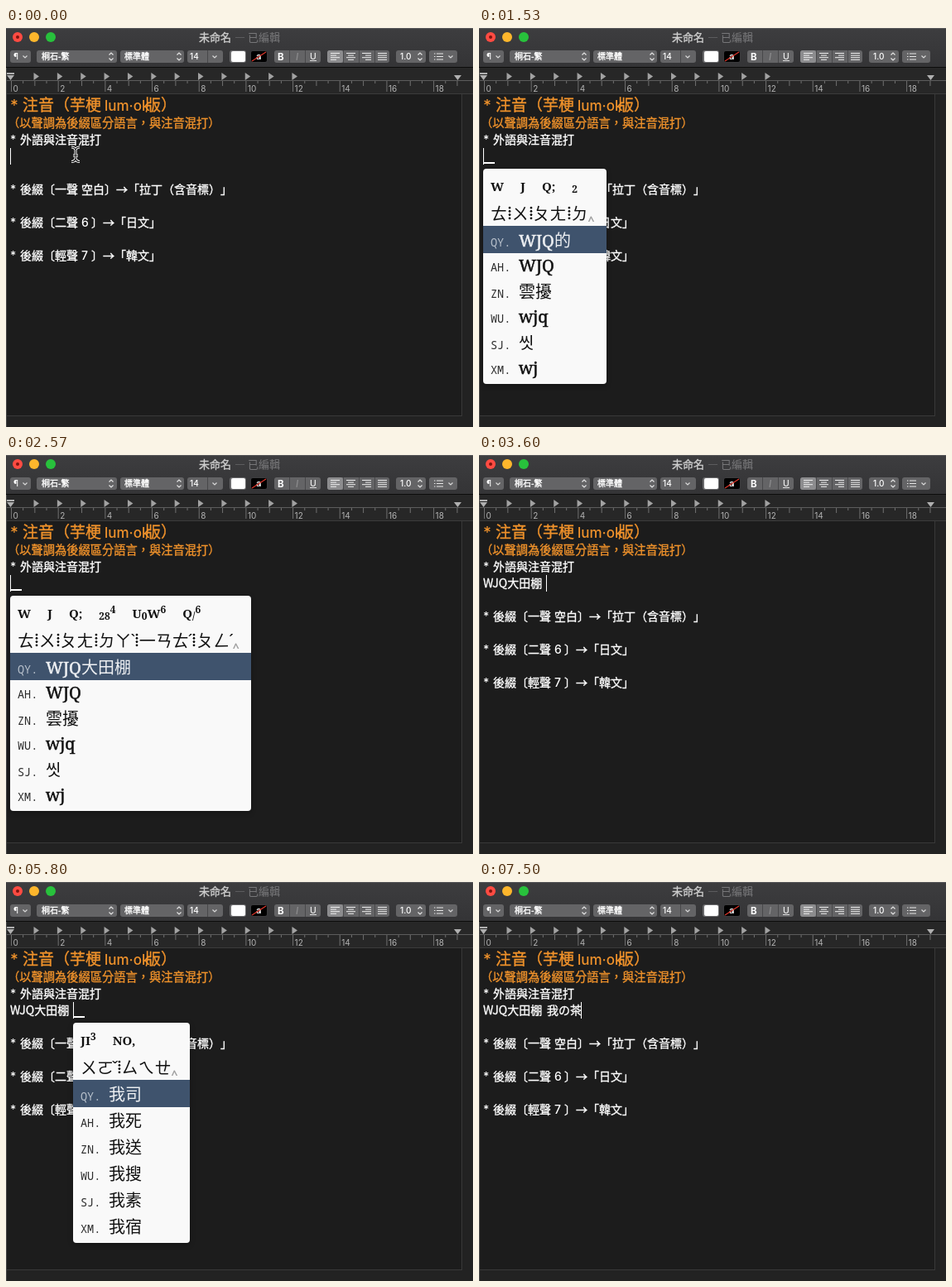
Recreate the animation shown at these times as an HTML page. Size 564 by 482 pixels, loop 8000 ms.

```html
<!DOCTYPE html>
<html lang="zh-Hant">
<head>
<meta charset="utf-8">
<style>
html, body { margin: 0; width: 564px; height: 482px; overflow: hidden; background: #1d1d1d; }
body { position: relative; text-spacing-trim: space-all; }
svg { position: absolute; left: 0; top: 0; }
svg text { font-family: "Noto Sans CJK TC", "Noto Sans CJK SC", sans-serif; font-weight: 500; white-space: pre; stroke-width: .35px; }
svg text.latin { font-family: Inter, sans-serif; stroke: none; }
svg text.thin { font-weight: 400; stroke: none; }
svg text.bold { font-weight: 700; }
#popup { position: absolute; top: 170px; border-radius: 4px; background: #f9f9f9; color: #111;
  box-shadow: 0 2px 6px rgba(0, 0, 0, .3); overflow: hidden; white-space: nowrap; }
#keys { position: absolute; left: 9px; top: 10px; font: bold 15px/22px "Noto Serif", serif; }
#keys span { margin-right: 20px; }
#keys small { font-size: 12px; position: relative; top: 2px; }
#keys sup { font-size: 12px; line-height: 0; vertical-align: 6px; }
#sounds { position: absolute; left: 9px; top: 39px; height: 30px;
  font: 20px/30px "Noto Sans CJK TC", "Noto Sans CJK SC", sans-serif; display: flex; }
#sounds > * { flex-shrink: 0; }
#sounds b { width: 20px; font-weight: 400; text-align: center; }
#sounds i { width: 3.6px; font-family: "Noto Sans", sans-serif; font-style: normal; display: flex; justify-content: center; }
#sounds u { width: 5.8px; height: 17px; margin-top: 6px;
  background: radial-gradient(circle, #111 1.2px, transparent 1.7px) 0 0 / 5.8px 4.25px; }
#sounds s { font: bold 14px/30px "Noto Sans", sans-serif; color: #a0a0a0; text-decoration: none; position: relative; top: 9px; }
.row { position: relative; height: 32px; padding-left: 9px;
  font: 20px/32px "Noto Serif", "Noto Sans CJK TC", "Noto Sans CJK SC", serif; }
.row.latin { height: 30px; line-height: 28px; }
.row b { font-weight: 400; -webkit-text-stroke: .5px; }
.row em { font: 500 13.5px "Noto Sans Mono", monospace; color: #2c2c2c; display: inline-block; width: 34px; }
#rows { position: absolute; top: 71px; left: 0; right: 0; }
.row:first-child { color: #eef0f3; }
.row:first-child em { color: #b8c1cc; }
#mark { position: absolute; left: 0; right: 0; top: 69px; height: 33px; background: #3f536d; }
</style>
</head>
<body>
<svg id="stage" width="564" height="482"></svg>
<div id="popup"><div id="keys"></div><div id="sounds"></div><div id="mark"></div><div id="rows"></div></div>
<script>
const $ = id => document.getElementById(id);
const rect = (x, y, w, h, fill, r = 0) => `<rect x="${x}" y="${y}" width="${w}" height="${h}" rx="${r}" fill="${fill}"/>`;
const text = (x, y, size, str, fill = '#fff', cls = '', extra = '') =>
  `<text x="${x}" y="${y}" font-size="${size}" fill="${fill}" stroke="${fill}" class="${cls} ${/^[ -~·¶]+$/.test(str) ? 'latin' : ''}" ${extra}>${str}</text>`;
const path = (d, stroke = '#ddd', w = 1, fill = 'none') =>
  `<path d="${d}" stroke="${stroke}" stroke-width="${w}" fill="${fill}"/>`;
const button = (x, w, fill = '#646466') => rect(x, 27, w, 15, fill, 3);
const updown = x => path(`M${x - 2.5} 32.5l2.5 -2.5l2.5 2.5M${x - 2.5} 36.5l2.5 2.5l2.5 -2.5`, '#e4e4e4', 1.2);
const down = x => path(`M${x - 2.5} 33.5l2.5 2.5l2.5 -2.5`, '#d8d8d8', 1.2);

function toolbar() {
  let s = '<defs><linearGradient id="bar" x2="0" y2="1"><stop stop-color="#3d3d3f"/><stop offset="1" stop-color="#343436"/></linearGradient></defs>';
  s += rect(0, 0, 564, 47, 'url(#bar)') + rect(0, 0, 564, 1, '#5a5a5c') + rect(0, 47, 564, 1, '#0c0c0c');
  ['#ff4b42', '#fdb62c', '#28c13c'].forEach((c, i) => s += `<circle cx="${14 + 20 * i}" cy="11" r="6" fill="${c}"/>`);
  s += '<circle cx="14" cy="11" r="2" fill="#7c150f"/>';
  s += text(233, 16, 13, '未命名', '#cfcfcf') + text(276, 16, 13, '— 已編輯', '#79797b', 'thin');
  [[5, 25], [37, 97], [138, 77], [219, 43], [324, 56], [388, 75], [471, 36], [511, 34]].forEach(b => s += button(...b));
  s += text(9, 38, 10, '¶') + down(23) + text(43, 38, 10, '桐石-繁') + updown(127);
  s += text(143, 38, 10, '標準體') + updown(209) + text(222, 38, 10, '14') + rect(243, 27, 1, 15, '#48484a') + down(252);
  s += button(270, 20, '#6a6a6c') + rect(272, 28, 17, 13, '#fff', 2);
  s += button(295, 21, '#3c3c3e') + rect(296, 28, 19, 13, '#000', 2) + text(302, 38, 11, 'a', '#fff', 'bold');
  s += path('M297 40L314 29', '#e0382c', 1.2);
  s += rect(342, 27, 1, 15, '#48484a') + rect(361, 27, 1, 15, '#48484a');
  s += text(328, 38.5, 11.5, 'B', '#fff', 'bold') + text(350, 38.5, 11.5, 'I', '#8c8c8e', '', 'font-style="italic"');
  s += text(367, 37.5, 10.5, 'U', '#eee') + path('M367 39.5h8');
  s += button(388, 19, '#8c8c8e');
  for (let i = 0; i < 4; i++) {
    const x = 392 + 19 * i;
    if (i) s += rect(x - 4, 27, 1, 15, '#48484a');
    for (let j = 0; j < 4; j++) {
      const w = i < 3 && j % 2 ? 7 : 11, dx = [0, (11 - w) / 2, 11 - w, 0][i];
      s += path(`M${x + dx} ${30.5 + 2.6 * j}h${w}`, '#f0f0f0');
    }
  }
  s += text(476, 38, 10, '1.0') + updown(500) + down(537);
  for (let j = 0; j < 3; j++) s += path(`M517 ${31 + 3.5 * j}h1.5M520 ${31 + 3.5 * j}h8`, '#e8e8e8', 1.1);
  return s;
}

function ruler() {
  let s = rect(0, 48, 564, 31, '#272727') + rect(0, 63, 564, 1, '#5c5c5c') + rect(0, 79, 564, 1, '#3c3c3c');
  for (let i = 0; i < 39; i++) {
    const x = 6.5 + 14.17 * i;
    s += path(`M${x} 64v${i % 4 == 0 ? 13 : i % 2 ? 3 : 6}`, '#707070');
    if (i % 4 == 0) s += text(x + 2, 76.5, 10, i / 2, '#b4b4b4', 'thin');
  }
  for (let i = 0; i < 12; i++) s += path(`M${33.5 + 28.36 * i} 54v9l6.5 -4.5z`, 'none', 0, '#a2a2a2');
  return s + rect(1, 54, 9, 2, '#b0b0b0') + path('M1 57h9l-4.5 6zM541 57h9l-4.5 6z', 'none', 0, '#b0b0b0');
}

function page() {
  const gold = '#f0922b', line = (y, ...parts) => {
    let s = text(5, y, 14, '*');
    for (let i = 0; i < parts.length; i += 2) s += text(parts[i], y, 14, parts[i + 1]);
    return s;
  };
  return rect(0, 80, 564, 402, '#1c1c1c') + rect(551, 80, 13, 402, '#222') + rect(0, 469, 564, 13, '#222') +
    rect(550, 80, 1, 389, '#393939') + rect(0, 468, 551, 1, '#393939') + rect(0, 48, 1, 434, '#4a4a4a') +
    text(5, 100, 19, '*', gold) + text(20, 100, 19, '注音（芋梗', gold) + text(119, 100, 17, 'lum·ok', gold) + text(168, 100, 19, '版）', gold) +
    text(2, 120, 14.25, '（以聲調為後綴區分語言，與注音混打）', gold) +
    line(140, 17, '外語與注音混打') +
    line(200, 17, '後綴〔一聲', 91, '空白〕→「拉丁（含音標）」') +
    line(240, 17, '後綴〔二聲', 91, '6', 103, '〕→「日文」') +
    line(280, 17, '後綴〔輕聲', 91, '7', 103, '〕→「韓文」') +
    text(5, 160, 14, '', '#fff', '', 'id="typed1"') + text(82, 160, 14, '', '#fff', '', 'id="typed2"') +
    '<rect id="under" y="162" width="13" height="2" fill="#fff"/><rect id="caret" y="145" width="1" height="20" fill="#fff"/>';
}

const beam = 'M79 144q4 0 5 3q1 -3 5 -3M84 147v11M79 161.5q4 0 5 -3.5q1 3.5 5 3.5M81 154h6';
$('stage').innerHTML = toolbar() + ruler() + page() +
  `<g id="pointer">${path(beam, '#fff', 3)}${path(beam, '#111', 1.1)}</g>`;

const sound = { W: 'ㄊ', J: 'ㄨ', Q: 'ㄆ', ';': 'ㄤ', 2: 'ㄉ', 8: 'ㄚ', U: '一', 0: 'ㄢ', '/': 'ㄥ',
  I: 'ㄛ', N: 'ㄙ', O: 'ㄟ', ',': 'ㄝ', T: 'ㄔ' };
const tone = { 3: 'ˇ', 4: 'ˋ', 6: 'ˊ' };
const tail = 'WJQ 雲擾 wjq 씻 wj', mine = '我司 我死 我送 我搜 我素';
// Each input: the keys, when they land, and the choices from a given number of keys on.
const inputs = [
  { x: 5, end: 2900, keys: 'W J Q; 284U0W6Q/6',
    at: [30, 200, 430, 600, 800, 930, 1100, 1500, 1600, 1700, 1830, 1900, 2000, 2100, 2200, 2300, 2570],
    picks: { 1: 'w 它 他 她 太 天', 3: 'wj 雲擾 雲 允 씨 運', 5: tail + ' 雲', 8: 'WJQ的 ' + tail, 9: 'WJQ大 ' + tail,
      11: 'WJQ大一 ' + tail, 12: 'WJQ大言 ' + tail, 13: 'WJQ大田 ' + tail, 15: 'WJQ大田片 ' + tail, 16: 'WJQ大田棚 ' + tail } },
  { x: 81, end: 7500, keys: 'JI3NO, T86',
    at: [4400, 4500, 4600, 4930, 5230, 5800, 6070, 6570, 6670, 6930],
    picks: { 1: '我 無 五 物 屋 霧', 2: '我 窩 握 臥 沃 渦', 4: mine + ' 我宿', 7: '我の ' + mine, 8: '我の茶 ' + mine } }
];
const labels = ['QY', 'AH', 'ZN', 'WU', 'SJ', 'XM'];
const blinks = [[800, 1000], [1300, 1500], [2330, 2430], [3430, 3600], [4070, 4400], [5500, 5800], [6570, 6900]];

function showPopup(input, n) {
  const typed = input.keys.slice(0, n), groups = typed.match(/[^ 346]+[ 346]?/g);
  $('keys').innerHTML = groups.map(g => '<span>' + [...g.trim()].map(k =>
    tone[k] ? `<sup>${k}</sup>` : /[028/]/.test(k) ? `<small>${k}</small>` : k).join('') + '</span>').join('');
  const dots = '<u></u>';
  const sounds = groups.map(g => [...g.trim()].map(k =>
    tone[k] ? `<i>${tone[k]}</i>` : `<b>${sound[k]}</b>`).join('')).join(dots) + (typed.endsWith(' ') ? dots : '');
  $('sounds').innerHTML = sounds + '<s>^</s>';
  const count = tag => sounds.split(tag).length - 1;
  const step = Math.max(...Object.keys(input.picks).filter(k => k <= n));
  const list = input.picks[step].split(' '), latin = w => /^\w+$/.test(w);
  $('rows').innerHTML = list.map((w, i) =>
    `<div class="row${latin(w) ? ' latin' : ''}"><em>${labels[i]}.</em>${w.replace(/\w+/, '<b>$&</b>')}</div>`).join('');
  const reach = Math.max(...list.map(w => [...w].reduce((sum, c) => sum + (latin(c) ? 14.5 : 20), 0)));
  const width = Math.max(31 + 20 * count('<b>') + 3.6 * count('<i>') + 5.8 * count('<u>'), 52 + reach);
  const style = $('popup').style;
  style.left = input.x + 'px';
  style.width = Math.ceil(width) + 'px';
  style.height = list.reduce((h, w) => h + (latin(w) ? 30 : 32), 74) + 'px';
}

let last = '';
function draw(now) {
  const t = now % 8000;
  const input = inputs.find(p => t >= p.at[0] && t < p.end);
  const n = input ? input.at.filter(a => a <= t).length : 0;
  const state = input ? input.x + ':' + n : '';
  if (state && state !== last) showPopup(input, n);
  last = state;
  $('popup').style.visibility = $('under').style.visibility = input ? 'visible' : 'hidden';
  if (input) $('under').setAttribute('x', input.x + 1);
  $('pointer').style.visibility = t < 30 ? 'visible' : 'hidden';
  $('typed1').textContent = t < 2900 ? '' : 'WJQ大田棚';
  $('typed2').textContent = t < 7500 ? '' : '我の茶';
  $('caret').setAttribute('x', t < 2900 ? 5 : t < 3600 ? 77 : t < 7500 ? 81 : 123);
  $('caret').style.visibility = blinks.some(([a, b]) => t >= a && t < b) ? 'hidden' : 'visible';
}
const start = performance.now();
(function loop() {
  draw(performance.now() - start);
  requestAnimationFrame(loop);
})();
</script>
</body>
</html>
```
